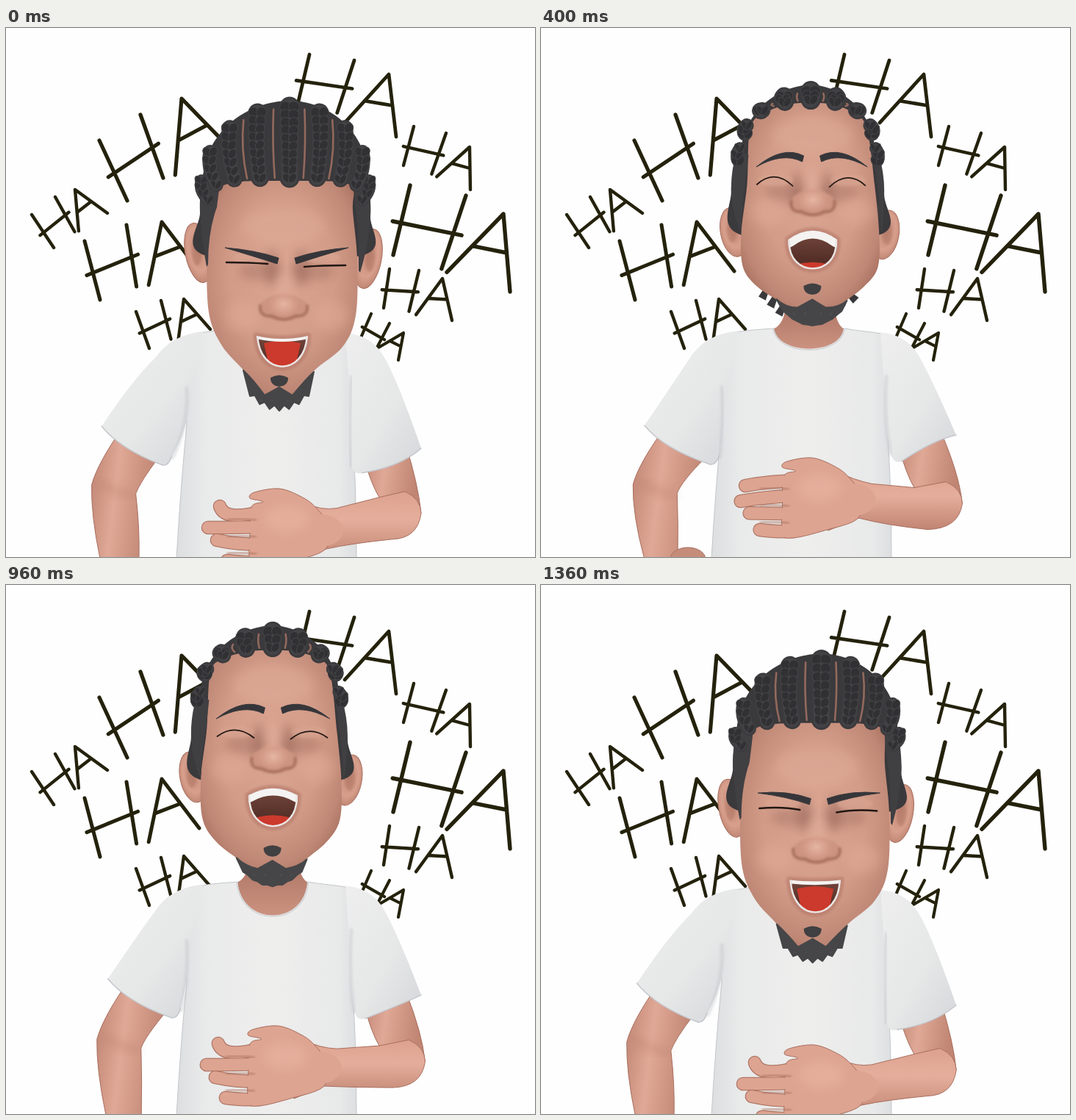
These frames come from a looping animation (720 by 720 pixels, 1440 ms). An HTML page:

```html
<!DOCTYPE html>
<html lang="en">
<head>
<meta charset="utf-8">
<title>Laughing</title>
<style>
html, body { margin: 0; width: 100%; height: 100%; overflow: hidden; background: #fefefe; }
svg { display: block; width: 100vw; height: 100vh; }
</style>
</head>
<body>
<svg viewBox="0 0 720 720">
  <defs>
    <radialGradient id="skin" cx=".5" cy=".42" r=".62">
      <stop offset="0" stop-color="#dba693"/><stop offset=".55" stop-color="#d29c88"/>
      <stop offset=".85" stop-color="#bf8876"/><stop offset="1" stop-color="#a87060"/>
    </radialGradient>
    <linearGradient id="arm" x1="0" y1="0" x2="1" y2=".25">
      <stop offset="0" stop-color="#bd8271"/><stop offset=".45" stop-color="#e0a896"/><stop offset="1" stop-color="#c08573"/>
    </linearGradient>
    <linearGradient id="fore" x1="0" y1="0" x2="0" y2="1">
      <stop offset="0" stop-color="#dda28f"/><stop offset=".4" stop-color="#e5ae9c"/><stop offset="1" stop-color="#c08371"/>
    </linearGradient>
    <linearGradient id="neck" x1="0" y1="0" x2="0" y2="1">
      <stop offset="0" stop-color="#a56d5d"/><stop offset="1" stop-color="#cb9280"/>
    </linearGradient>
    <radialGradient id="ear" cx=".5" cy=".45" r=".6">
      <stop offset="0" stop-color="#c48876"/><stop offset=".6" stop-color="#d79f8c"/><stop offset="1" stop-color="#bd8270"/>
    </radialGradient>
    <radialGradient id="bulb">
      <stop offset="0" stop-color="#e6b5a3"/><stop offset=".5" stop-color="#dca694" stop-opacity=".8"/><stop offset="1" stop-color="#d39c88" stop-opacity="0"/>
    </radialGradient>
    <linearGradient id="torso">
      <stop offset="0" stop-color="#dcdee0"/><stop offset=".15" stop-color="#e9eaea"/><stop offset=".5" stop-color="#eeeeed"/>
      <stop offset=".85" stop-color="#e8e9e9"/><stop offset="1" stop-color="#d6d8dc"/>
    </linearGradient>
    <linearGradient id="sleeve" x1="0" y1="0" x2=".9" y2="1">
      <stop offset="0" stop-color="#eeeeee"/><stop offset=".6" stop-color="#e6e7e7"/><stop offset="1" stop-color="#d6d8db"/>
    </linearGradient>
    <linearGradient id="throat" x1="0" y1="0" x2="0" y2="1">
      <stop offset="0" stop-color="#74473d"/><stop offset="1" stop-color="#4a2720"/>
    </linearGradient>
    <filter id="soft" x="-50%" y="-50%" width="200%" height="200%"><feGaussianBlur stdDeviation="7"/></filter>
    <filter id="fine" x="-30%" y="-30%" width="160%" height="160%"><feGaussianBlur stdDeviation="1.8"/></filter>
  </defs>
  <g id="words" stroke="#24220c" stroke-linecap="round" stroke-linejoin="round" fill="none"></g>
  <g id="man"></g>
</svg>
<script>
const LOOP = 1440, STEP = 80;

// The whole figure follows five controls.
const TIMES = [0, 240, 400, 640, 960, 1120, 1360];
const RIG = {
  nx:  [378, 374, 370, 370, 364, 366, 375],  // nose, across
  eye: [319, 197, 213, 195, 206, 251, 304],  // eye line, down
  p:   [1, .16, .1, 0, .24, .43, .88],       // head pitch: 0 thrown back, 1 bowed
  s:   [18, 0, 17, 9, 12, 19, 18],           // shoulder drop
  h:   [50, 0, 8, 4, 23, 46, 49]             // hand drop
};

const lerp = (a, b, k) => a + (b - a) * k;
const clamp = k => Math.min(1, Math.max(0, k));
const r1 = n => Math.round(n * 10) / 10;
const pt = p => r1(p[0]) + ' ' + r1(p[1]);

// Monotone cubic through the key values, closed in time.
function sample(v, t) {
  const n = TIMES.length;
  const time = i => TIMES[(i + n) % n] + Math.floor(i / n) * LOOP;
  const val = i => v[(i + n) % n];
  const rate = i => (val(i + 1) - val(i)) / (time(i + 1) - time(i));
  const slope = i => {
    const a = rate(i - 1), b = rate(i);
    return a * b > 0 ? 2 * a * b / (a + b) : 0;
  };
  let i = n - 1;
  while (TIMES[i] > t) i--;
  const h = time(i + 1) - time(i), k = (t - TIMES[i]) / h, q = 1 - k;
  return val(i) * (1 + 2 * k) * q * q + val(i + 1) * k * k * (3 - 2 * k)
    + h * (slope(i) * k * q * q - slope(i + 1) * k * k * q);
}

function headPose({ nx, eye, p }) {
  const q = p ** .8, mid = p * (1 - p), frown = clamp((p - .45) / .55), by = eye + 149 + 100 * mid;
  return {
    frown, by,
    cx: nx - 4 + 12 * p, mid: nx - 8 + 10 * p, half: 102 + 14 * q,
    top: eye - 128 - 96 * p - 20 * mid, line: eye - 101 - 5 * p - 55 * mid,
    earL: nx - 109 - 10 * q, earR: nx + 98 + 19 * q,
    earY: eye + 71 - 84 * p + 25 * mid, tilt: 3 + 5 * p, tail: clamp(1 - 5 * p),
    bx: nx - 2 + 6 * p, bw: 74 + 10 * q, bIn: eye - 35 + 33 * frown, bOut: eye - 24 + 4 * frown,
    bUp: 20 - 18 * frown, lid: 12 * (1 - p), ny: eye + 34 + 43 * q,
    mx: nx - 2 * p, mw: 33 + 2 * p, mTop: eye + 55 + 49 * q, mBot: eye + 108 + 49 * q - 14 * p ** 3,
    arch: lerp(14, -4, p), px: nx - 6 * p, py: by - 19 + 31 * p, bBot: by + 32 + 21 * p
  };
}

function bodyPose({ s, h }) {
  return {
    sy: 393 + .95 * s, col: 366 - .12 * h, dip: 430 + .9 * h, bulge: lerp(2, 26, clamp(h / 45)),
    lx: 148 - .25 * h - .3 * s, ly: 524 + s, lbx: 237 - .4 * h - .2 * s, lby: 577 + s,
    rx: 565, ry: 543 + .45 * s + .42 * h, rbx: 480 - .15 * h, rby: 570 + s + .35 * h,
    ax: 132 - .2 * h - .3 * s, ay: 617 + .6 * s, ao: 143 - .3 * h, ai: 187 - .12 * h,
    hx: .08 * h, curl: clamp((h - 6) / 16), ex: 575 - .2 * h, ey: 635 + .3 * h + .6 * s
  };
}

function pose(t) {
  const rig = {};
  for (const key in RIG) rig[key] = sample(RIG[key], t);
  rig.p = clamp(rig.p);
  return { ...rig, ...headPose(rig), ...bodyPose(rig), fist: 723 + Math.abs(t - 400) / 8 };
}

// Smooth closed outline through points.
function curve(p) {
  const n = p.length, at = i => p[(i + n) % n];
  let out = 'M' + pt(p[0]);
  for (let i = 0; i < n; i++) {
    const [a, b, c, e] = [at(i - 1), at(i), at(i + 1), at(i + 2)];
    out += 'C' + pt([b[0] + (c[0] - a[0]) / 6, b[1] + (c[1] - a[1]) / 6])
      + ' ' + pt([c[0] - (e[0] - b[0]) / 6, c[1] - (e[1] - b[1]) / 6]) + ' ' + pt(c);
  }
  return out + 'Z';
}
// Path text with its coordinates rounded.
const d = (s, ...v) => s.reduce((a, x, i) => a + r1(v[i - 1]) + x);
const fill = (path, color, more = '') => `<path d="${path}" fill="${color}" ${more}/>`;
const line = (path, color, w, more = '') =>
  `<path d="${path}" fill="none" stroke="${color}" stroke-width="${r1(w)}" stroke-linecap="round" stroke-linejoin="round" ${more}/>`;
const oval = (x, y, rx, ry, color, more = '') =>
  `<ellipse cx="${r1(x)}" cy="${r1(y)}" rx="${r1(rx)}" ry="${r1(ry)}" fill="${color}" ${more}/>`;
const turn = (a, x, y) => `transform="rotate(${r1(a)} ${r1(x)} ${r1(y)})"`;
const SOFT = 'filter="url(#soft)"', FINE = 'filter="url(#fine)"';
const EDGE = 'stroke="#a86f5f" stroke-width="1"';

// A hand-lettered HA: first stem, top of the second, then apex and right foot of the A.
function word([x1, y1, x2, y2], [x3, y3], [ax, ay, rx, ry]) {
  const dx = x2 - x1, dy = y2 - y1, ux = rx - ax, uy = ry - ay;
  const on = (a, b, k) => [lerp(a[0], b[0], k), lerp(a[1], b[1], k)];
  const seg = (a, b) => 'M' + pt(a) + 'L' + pt(b);
  const top = [x3, y3], foot = [x3 + dx * 1.03 - dy * .1, y3 + dy * 1.05];
  const bend = .855, c = Math.cos(bend) * 1.04, n = Math.sin(bend) * 1.04;
  const apex = [ax, ay], right = [rx, ry], left = [ax + ux * c - uy * n, ay + ux * n + uy * c];
  const p = on([x1, y1], [x2, y2], .54), q = on(top, foot, .52);
  return line(seg([x1, y1], [x2, y2]) + seg(top, foot) + seg(on(p, q, -.16), on(p, q, 1.16))
    + seg(left, apex) + 'L' + pt(right) + seg(on(apex, left, .55), on(apex, right, .5)),
    '#24220c', 3.2 + Math.hypot(dx, dy) / 45);
}
document.getElementById('words').innerHTML = [
  word([127, 153, 165, 235], [183, 118], [239, 96, 309, 168]),
  word([35, 254, 65, 299], [67, 230], [94, 220, 138, 252]),
  word([107, 290, 128, 370], [164, 268], [212, 264, 263, 331]),
  word([177, 386, 195, 436], [211, 371], [242, 369, 278, 410]),
  word([413, 36, 397, 104], [474, 44], [521, 63, 531, 148]),
  word([555, 134, 541, 187], [599, 143], [631, 162, 632, 220]),
  word([550, 214, 527, 309], [626, 228], [677, 253, 686, 359]),
  word([522, 328, 514, 381], [562, 330], [594, 341, 607, 398]),
  word([497, 389, 481, 426], [522, 402], [541, 415, 534, 452])
].join('');

function upperArms(o) {
  const left = d`M${o.lx + 30} ${o.ly}Q${o.ax + 8} ${o.ay - 36} ${o.ax} ${o.ay - 6}Q${o.ax - 1} ${o.ay + 35} ${o.ao} 722L${o.ai} 722Q${o.ai + 1} ${o.ay + 50} ${o.ax + 60} ${o.ay + 6}Q${o.ax + 66} ${o.ay - 10} ${o.lbx - 6} ${o.lby - 10}Z`;
  const right = d`M${o.rx - 45} ${o.ry - 40}L${o.rx - 21} ${o.ry - 5}Q${o.ex - 4} ${o.ey - 40} ${o.ex} ${o.ey}L${o.ex - 50} ${o.ey + 12}L508 ${o.ey - 22}Q497 ${o.ey - 40} 487 ${o.rby - 20}Z`;
  return fill(left, 'url(#arm)', EDGE)
    + line(d`M${o.ax + 10} ${o.ay - 8}Q${o.ax + 32} ${o.ay + 4} ${o.ax + 54} ${o.ay + 8}`, '#b57a69', 7, SOFT + ' opacity=".5"')
    + oval(200, o.fist, 24, 16, '#c68c7a', EDGE) + fill(right, 'url(#arm)', EDGE);
}

function shirt(o) {
  const s = o.sy, c = o.col;
  const body = d`M${c - 51} ${s}C280 ${s + 2} 255 ${s + 4} 232 ${s + 16}L246 540Q238 620 232 722L477 722Q477 620 470 520L492 ${s + 16}C470 ${s + 4} 440 ${s + 5} ${c + 50} ${s}Z`;
  const cuffL = d`M${o.lx} ${o.ly}Q${o.lx + 26} ${o.ly + 32} ${o.lbx} ${o.lby}Q${o.lbx + 8} ${o.lby + 1} ${o.lbx + 12} ${o.lby - 12}`;
  const cuffR = d`M${o.rx} ${o.ry}Q${o.rx - 30} ${o.ry + o.bulge} ${o.rbx + 12} ${o.rby}`;
  const left = cuffL + d`Q246 ${s + 138} 248 ${s + 108}L268 ${s + 3}Q224 ${s + 8} 204 ${s + 38}Q${o.lx + 45} ${s + 65} ${o.lx} ${o.ly}Z`;
  const right = cuffR + d`Q${o.rbx} ${o.rby + 4} ${o.rbx - 3} ${o.rby - 12}Q466 ${s + 125} 468 ${s + 90}L462 ${s + 5}Q500 ${s + 8} 517 ${s + 42}Q${o.rx - 30} ${s + 75} ${o.rx} ${o.ry}Z`;
  const fold = 'opacity=".45" ' + FINE;
  return fill(body, 'url(#torso)', 'stroke="#c3c6ca" stroke-width="1"')
    + fill(left, 'url(#sleeve)') + fill(right, 'url(#sleeve)')
    + line(cuffL, '#c3c6cc', 1.4) + line(cuffR, '#c3c6cc', 1.4)
    + line(d`M${o.lbx + 13} ${o.lby - 10}Q249 ${s + 130} 246 ${s + 80}`, '#c2c6ca', 5, fold)
    + line(d`M${o.rbx - 3} ${o.rby - 10}Q466 ${s + 125} 470 ${s + 65}`, '#c2c6ca', 5, fold);
}

function neck(o) {
  const x = o.col, y = o.sy, k = (o.dip - y) * 1.3 + y;
  return fill(d`M${x - 31} ${y - 50}Q${x - 30} ${y - 8} ${x - 48} ${y}C${x - 42} ${k} ${x + 42} ${k} ${x + 47} ${y}Q${x + 33} ${y - 8} ${x + 34} ${y - 50}Z`, 'url(#neck)')
    + line(d`M${x - 49} ${y}C${x - 43} ${k + 2} ${x + 43} ${k + 2} ${x + 48} ${y}`, '#d5d6d8', 2);
}

// Nine braids fan over the skull from the crown to the hairline.
function braids(o) {
  const list = [];
  for (let i = -4; i <= 4; i++) {
    const j = Math.abs(i), s = Math.sign(i), x = lerp(o.cx, o.mid, j / 4), a = j * .38;
    const root = [x + s * Math.sin(a) * (93 + 21 * o.p), o.top + 12 + (1 - Math.cos(a)) * (100 + 6 * o.p)];
    const tip = [x + s * Math.sin(a) * (91 + 14 * o.p), o.line - 9 + (j / 4) ** (2 + 2 * o.p) * (70 - 40 * o.p)];
    list.push({ s, j, root, tip, bend: [root[0] + s * 4, (root[1] + tip[1]) / 2], w: 27 - 2.6 * j });
  }
  return list;
}

function braid(b) {
  const path = 'M' + pt(b.root) + 'Q' + pt(b.bend) + ' ' + pt(b.tip);
  const n = Math.max(2, Math.round(Math.hypot(b.tip[0] - b.root[0], b.tip[1] - b.root[1]) / 11));
  let s = line(path, '#3b3a3d', b.w) + line(path, '#424144', b.w * .8);
  for (let k = 0; k <= n; k++) {
    const u = k / n, at = c => lerp(lerp(b.root[c], b.bend[c], u), lerp(b.bend[c], b.tip[c], u), u);
    const w = b.w * lerp(.28, .18, u);
    for (const side of [-1, 1]) {
      const x = at(0) + side * w * .8, y = at(1);
      s += oval(x, y, w, 7, '#313033', 'stroke="#48474a" stroke-width=".9" ' + turn(side * 32, x, y));
    }
  }
  return s;
}

function backHair(o, list) {
  let s = '';
  for (let k = 0; k < 5 && o.tail > .05; k++) {
    const left = k < 3, x = left ? 13 * k - 74 : 120 - 20 * k, y = left ? 11 * k - 11 : 10 * k - 36;
    const px = o.px + x * lerp(.75, 1, o.tail), py = o.by + y;
    s += fill(d`M${px - 3} ${py - 10}L${px + 3} ${py - 10}L${px + 6} ${py + 9}L${px - 5} ${py + 9}Z`, '#39383b', turn(left ? 28 : -45, px, py));
  }
  return s + fill(curve([[o.earL + 14, o.earY + 4], [o.mid - o.half, o.earY - 55],
    ...list.map(b => [b.root[0] - b.s * 2, b.root[1] - 8]),
    [o.mid + o.half, o.earY - 50], [o.earR - 12, o.earY + 4]]), '#3a393c');
}

function ears(o) {
  return [[-1, o.earL + 3, o.earY], [1, o.earR - 2, o.earY + o.tilt]].map(([s, x, y]) => {
    const h = 33 + 8 * o.p;
    return oval(x, y, 18, h, 'url(#ear)', EDGE + ' ' + turn(s * 11, x, y))
      + oval(x + s * 2, y - 3, 7, h * .5, '#a96f5f', FINE + ' opacity=".45"');
  }).join('');
}

function skull(o, list) {
  const l = o.earL + 13 + 2 * o.p, r = o.earR - 10 - 7 * o.p, y = o.earY, yr = y + o.tilt, b = o.by;
  const brow = list.slice(1, 8).map(k => [k.tip[0] - k.s * k.j * 1.5, k.tip[1] + 4]);
  return fill(curve([[l + 8, y - 66], ...brow, [r - 6, yr - 66], [r, yr],
    [r - 2, lerp(yr, b, .5)], [r - 20, lerp(yr, b, .78)], [o.px + 46, b], [o.px + 24, o.bBot - 18],
    [o.px, o.bBot - 13], [o.px - 24, o.bBot - 18], [o.px - 47, b], [l + 20, lerp(y, b, .78)],
    [l + 2, lerp(y, b, .5)], [l, y]]), 'url(#skin)');
}

function burns(o) {
  const drop = lerp(-6, 19, o.p);
  const side = (x, tip, inn, y, s) => fill(
    d`M${x + s * 8} ${y - 112}Q${x} ${y - 85} ${x} ${y - 60}Q${x + s} ${y - 25} ${tip - s * 2} ${y + drop}L${tip} ${y + drop - 3}Q${tip} ${y - 30} ${inn} ${y - 62}Q${inn + s * 3} ${y - 85} ${inn + s * 5} ${y - 105}Z`, '#403f42');
  return side(o.mid - o.half, o.earL + 13 + 3 * o.p, o.earL + 17 + 11 * o.p, o.earY, 1)
    + side(o.mid + o.half, o.earR - 8 - 7 * o.p, o.earR - 12 - 6 * o.p, o.earY + o.tilt, -1);
}

function eyesAndNose(o) {
  const { bx, nx, ny, eye } = o;
  let s = oval(nx, lerp(o.line, o.bIn, .55), 55, 26, '#e2b09d', SOFT + ' opacity=".4"');
  for (const k of [-1, 1]) {
    const out = bx + k * o.bw, inn = bx + k * 11, m = bx + k * o.bw * .52, my = (o.bIn + o.bOut) / 2 - o.bUp;
    const e = bx - 1, ew = lerp(73, 81, o.p), ey = eye + (k > 0 ? 1 + 3 * o.p : 0);
    s += oval(bx + k * 36, eye + 12, 30, 13, '#935f52', SOFT + ' opacity=".34"')
      + oval(bx + k * 20, eye + 8, 9, 26, '#8a584b', SOFT + ' opacity=".4"')
      + oval(bx + k * 60, ny - 4, 24, 20, '#e0ab98', SOFT + ' opacity=".5"')
      + oval(bx + k * 49, eye - 6, 24, 8, '#d9a592', FINE + ' opacity=".6"')
      + fill(d`M${out} ${o.bOut}Q${m} ${my - 4} ${inn} ${o.bIn - 4}L${inn + k * 2} ${o.bIn + 4}Q${m} ${my + 5} ${out} ${o.bOut}Z`, '#36363a', 'stroke="#36363a" stroke-width="1" stroke-linejoin="round"')
      + line(d`M${e + k * ew} ${ey}Q${e + k * 50} ${ey - 2 * o.lid} ${e + k * 25} ${ey + 2}`, '#211713', lerp(1.6, 2.6, o.p));
  }
  const w = lerp(29, 32, o.p);
  return s + oval(nx, ny - 34, 10, 30, '#e2b09e', SOFT + ' opacity=".5"')
    + oval(nx, ny - 15, w + 1, 18, '#cd9481', FINE) + oval(nx, ny - 20, 23, 19, 'url(#bulb)')
    + line(d`M${nx - w} ${ny - 18}Q${nx - w - 2} ${ny - 3} ${nx - 16} ${ny - 4}Q${nx} ${ny + 5} ${nx + 16} ${ny - 4}Q${nx + w + 2} ${ny - 3} ${nx + w} ${ny - 18}`, '#87503f', 4, FINE + ' opacity=".5"');
}

function mouth(o) {
  const x = o.mx, c = o.mTop + o.arch, L = x - o.mw, R = x + o.mw;
  const k = (o.mBot - c * .25) / .75, q = o.mw * lerp(1.12, .92, o.p);
  const up = d`M${L} ${c}Q${x} ${o.mTop - o.arch} ${R} ${c}`;
  const low = d`C${x + q} ${k} ${x - q} ${k} ${L} ${c}`;
  const shape = up + low + 'Z', ty = lerp(o.mBot - 5, o.mTop + 3, o.p);
  return line(shape, '#b27365', 9, FINE + ' opacity=".55"')
    + `<clipPath id="gap"><path d="${shape}"/></clipPath><g clip-path="url(#gap)">` + fill(shape, 'url(#throat)')
    + fill(d`M${x - 25} ${ty + 3}Q${x} ${ty - 4} ${x + 25} ${ty + 3}L${x + 17} ${o.mBot + 4}L${x - 17} ${o.mBot + 4}Z`, '#cb3a2c')
    + line(up, '#f4f3f2', lerp(23, 8, o.p)) + line(d`M${R} ${c}` + low, '#eae6e4', 5) + '</g>';
}

function beard(o) {
  const x = o.px, y = o.by, b = o.bBot, peak = y + lerp(-4, 21, o.p);
  let edge = '';
  for (let i = 0; i <= 12; i++) {
    const u = 1 - i / 6;
    edge += d`L${x + 40 * u} ${b - 20 * u * u - (i % 2 ? 7 * o.p : 0)}`;
  }
  const face = d`M${x - 49} ${y - 2}Q${x - 36} ${y + 10} ${x - 20} ${peak + 11}L${x} ${peak}L${x + 18} ${peak + 11}Q${x + 36} ${y + 10} ${x + 47} ${y}`;
  return fill(face + edge + 'Z', '#464648', 'stroke="#464648" stroke-width="2" stroke-linejoin="round"')
    + [-26, -10, 12, 27].map(v => line(d`M${x + v} ${peak + 18}L${x + v * .9} ${b - 14}`, '#59595b', 1.5, 'opacity=".5"')).join('')
    + fill(d`M${x - 12} ${o.py - 4}Q${x} ${o.py - 11} ${x + 12} ${o.py - 4}Q${x + 12} ${o.py + 7} ${x} ${o.py + 8}Q${x - 12} ${o.py + 7} ${x - 12} ${o.py - 4}Z`, '#403f41');
}

function hand(o) {
  const X = x => x + o.hx, Y = y => y + o.h, c = o.curl;
  const arm = d`M${X(405)} ${Y(597)}Q${X(425)} ${Y(607)} 450 ${lerp(Y(610), o.ey - 22, .3)}L508 ${o.ey - 22}L${o.ex - 22} ${o.ey - 30}Q${o.ex} ${o.ey - 20} ${o.ex} ${o.ey}Q${o.ex - 5} ${o.ey + 34} 526 ${o.ey + 35}Q470 ${lerp(Y(660), o.ey + 35, .6)} ${X(432)} ${Y(659)}L${X(390)} ${Y(676)}Z`;
  const finger = (x, y, y0, bx, by) => d`M${X(344)} ${Y(y0)}Q${X(bx)} ${Y(by)} ${X(x)} ${Y(y)}`;
  const fingers = [
    finger(lerp(276, 287, c), lerp(617, 601, c), 608, lerp(305, 294, c), lerp(608, 622, c)),
    finger(271, lerp(637, 630, c), 629, 305, 630),
    finger(283, lerp(653, 647, c), 653, 310, 653),
    finger(297, 675, 677, 318, 678)
  ];
  const palm = curve([[418, 603], [398, 588], [368, 577], [334, 582], [328, 590], [346, 595], [330, 602], [328, 640],
    [328, 680], [343, 686], [385, 676], [430, 660], [436, 630]].map(p => [X(p[0]), Y(p[1])]));
  return fill(arm, 'url(#fore)', EDGE) + fingers.map(f => line(f, '#a86f5f', 18.5) + line(f, '#d99f8c', 16.5)).join('')
    + fill(palm, '#dda491', EDGE) + fingers.map(f => line(f, '#dda491', 15)).join('')
    + oval(X(425), Y(634), 30, 22, '#dda491')
    + [619, 642, 665].map(y => line(d`M${X(298)} ${Y(y)}Q${X(320)} ${Y(y - 2)} ${X(336)} ${Y(y + 1)}`, '#ad7464', 2.5, FINE + ' opacity=".8"')).join('')
    + oval(X(378), Y(618), 30, 18, '#e7b2a0', SOFT + ' opacity=".7"');
}

function draw(t) {
  const o = pose(t), list = braids(o);
  const half = (a, b) => pt([(a[0] + b[0]) / 2, (a[1] + b[1]) / 2]);
  const parts = list.slice(2, 6).map((b, i) => {
    const n = list[i + 3];
    return line('M' + half(b.root, n.root) + 'Q' + half(b.bend, n.bend) + ' ' + half(b.tip, n.tip), '#a97665', 2.6, 'opacity=".8"');
  }).join('');
  const rows = [...list].sort((a, b) => b.j - a.j).map(braid).join('');
  return upperArms(o) + shirt(o) + neck(o) + ears(o) + backHair(o, list) + skull(o, list)
    + eyesAndNose(o) + mouth(o) + burns(o) + rows + parts + beard(o) + hand(o);
}

const man = document.getElementById('man');
let shown = -1;
function tick() {
  const step = Math.floor((performance.now() + .5) / STEP) % (LOOP / STEP);
  if (step !== shown) man.innerHTML = draw((shown = step) * STEP);
  requestAnimationFrame(tick);
}
tick();
</script>
</body>
</html>
```
